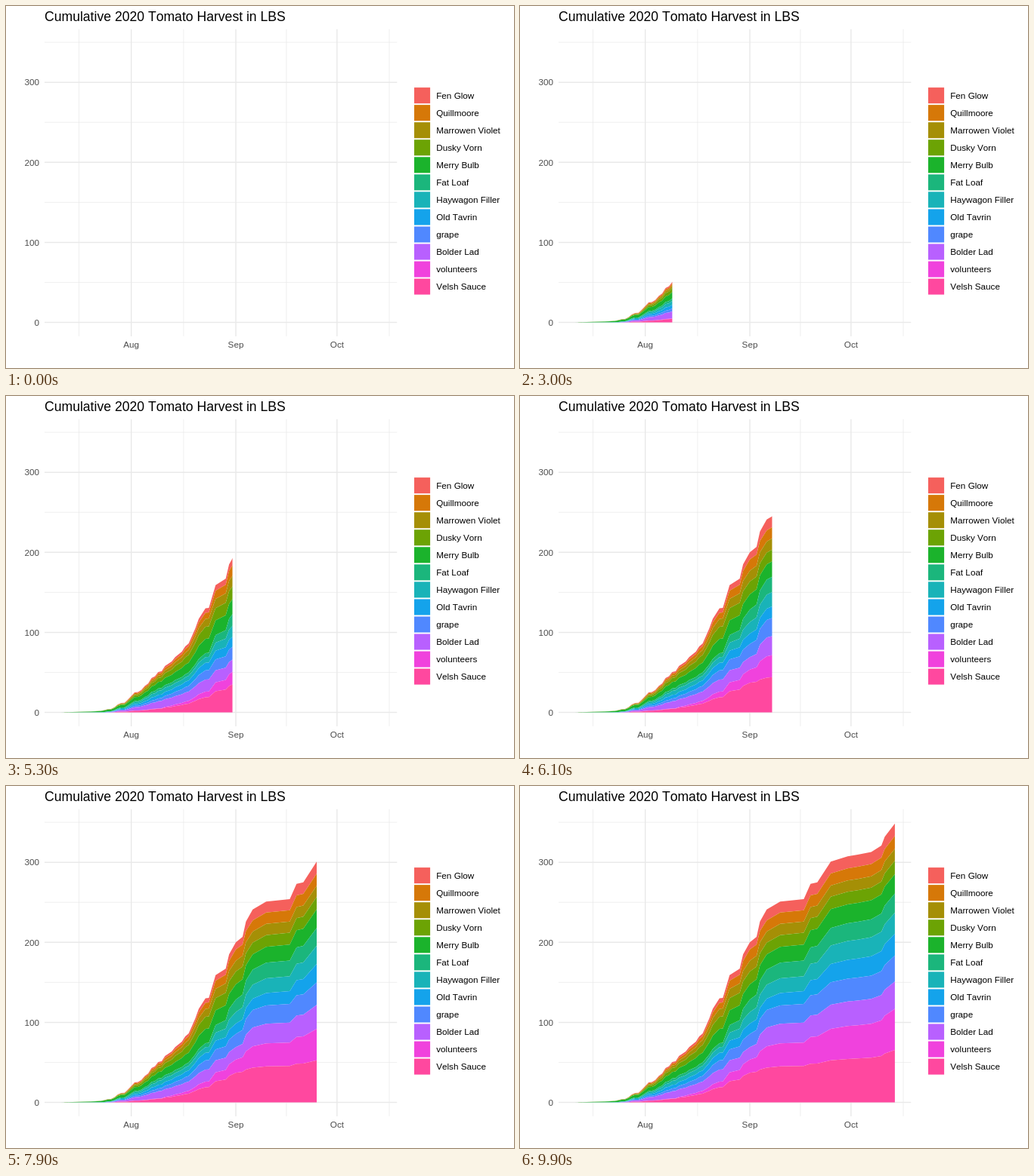
Animation, 672 px wide and 480 px high, one loop 10000 ms. Source, as an HTML page:

```html
<!DOCTYPE html>
<html lang="en">
<head>
<meta charset="utf-8">
<title>Tomato harvest</title>
<style>
  html, body { margin: 0; width: 100%; height: 100%; overflow: hidden; background: #fff; }
  svg { display: block; font: 11.73px "Liberation Sans", Arial, sans-serif; font-kerning: none; }
  .axis { fill: #4d4d4d; }
</style>
</head>
<body>
<svg width="672" height="480" viewBox="0 0 672 480">
  <clipPath id="reveal"><rect x="60" y="0" width="0" height="480"/></clipPath>
  <g id="grid" stroke="#e9e9e9"></g>
  <g id="areas" clip-path="url(#reveal)"></g>
  <g id="labels"><text x="51" y="20" font-size="17.6">Cumulative 2020 Tomato Harvest in LBS</text></g>
</svg>
<script>
const FRAMES = 99, DAYS = 95, STEP = 100;

// Stacked from the top of the legend down; the last one lies on the axis.
const series = [
  ['Fen Glow', '#f5605c'], ['Quillmoore', '#d67808'], ['Marrowen Violet', '#a58f06'],
  ['Dusky Vorn', '#6ca304'], ['Merry Bulb', '#1bb32c'], ['Fat Loaf', '#1bb67c'],
  ['Haywagon Filler', '#19b3b8'], ['Old Tavrin', '#14a3eb'], ['grape', '#5088ff'],
  ['Bolder Lad', '#b860ff'], ['volunteers', '#f042dd'], ['Velsh Sauce', '#ff489f']
];

// [day, total pounds]
const totals = [
  [0, 0], [9, 1.2], [12, 2], [13, 2.8], [14, 4], [15, 4.3], [16, 6.5], [17, 10],
  [18, 11.8], [19, 12], [20, 16], [21, 20.5], [22, 25], [23, 25.5], [24, 28], [25, 33],
  [26, 36], [27, 43], [28, 45], [29, 50.5], [30, 51.5], [31, 58], [33, 63.6], [34, 69],
  [36, 76], [37, 82.5], [38, 86], [39, 95.5], [40, 105], [41, 117], [43, 130], [44, 130.5],
  [46, 159], [49, 167], [50, 185], [52, 200], [54, 207], [55, 226], [57, 241], [61, 251],
  [68, 254], [70, 273], [72, 275], [76, 301], [81, 307.5], [84, 309.5], [88, 313],
  [91, 321], [92, 332], [95, 348.5]
];

// Layer tops from the axis upward at a few totals (last entry of each row).
const stacks = [
  Array(12).fill(0),
  [0, 0, 0, .1, .2, .3, .6, 2.5, 2.6, 2.7, 2.8, 2.8],
  [4.5, 5, 14, 17.5, 22, 27, 30, 38, 43, 46, 48.5, 50.5],
  [19, 26, 41, 52.5, 62, 69, 74, 92, 107, 117, 124.5, 130],
  [37, 53.5, 69, 85.5, 98.5, 113, 128.5, 147.5, 163.5, 177, 191, 200],
  [43.5, 70, 93.5, 115.5, 129.5, 147, 166, 185, 199.5, 213.5, 227.5, 241],
  [52.5, 92, 122, 150, 173, 196, 218, 241.5, 257, 271, 286, 301],
  [65.5, 117, 151, 183.5, 211, 237, 261, 285, 302, 317, 333, 348.5]
];

const $ = id => document.getElementById(id);
const px = day => 72 + day * 4.462;
const py = lbs => 419.55 - lbs * 1.0612;
const lerp = (a, b, p) => a + (b - a) * p;

function add(parent, tag, attrs, text = '') {
  const el = document.createElementNS('http://www.w3.org/2000/svg', tag);
  for (const k in attrs) el.setAttribute(k, attrs[k]);
  el.textContent = text;
  $(parent).append(el);
}

function layerTop(layer, total) {
  if (layer < 0) return 0;
  const i = Math.max(1, stacks.findIndex(s => s[11] >= total));
  const a = stacks[i - 1], b = stacks[i];
  return lerp(a[layer], b[layer], (total - a[11]) / (b[11] - a[11]));
}

const hLine = (lbs, w) => add('grid', 'path', { d: `M51 ${py(lbs)}H517.3`, 'stroke-width': w });
const vLine = (day, w) => add('grid', 'path', { d: `M${px(day)} 30.8V437.9`, 'stroke-width': w });

[50, 150, 250, 350].forEach(v => hLine(v, .71));
[5.5, 36.5, 67, 97.5].forEach(d => vLine(d, .71));
[0, 100, 200, 300].forEach(v => {
  hLine(v, 1.42);
  add('labels', 'text', { x: 44, y: py(v) + 4.2, 'text-anchor': 'end', class: 'axis' }, v);
});
[['Aug', 21], ['Sep', 52], ['Oct', 82]].forEach(([name, d]) => {
  vLine(d, 1.42);
  add('labels', 'text', { x: px(d), y: 453.2, 'text-anchor': 'middle', class: 'axis' }, name);
});

series.forEach(([name, fill], i) => {
  const y = 108.1 + i * 23.04, layer = 11 - i;
  add('labels', 'rect', { x: 540, y, width: 21.1, height: 21.1, fill });
  add('labels', 'text', { x: 569.2, y: y + 14.9 }, name);
  const edge = k => totals.map(([d, t]) => `${px(d)} ${py(layerTop(k, t))}`);
  add('areas', 'path', { d: `M${[...edge(layer), ...edge(layer - 1).reverse()].join('L')}Z`, fill });
});

// Each reading falls on a whole step; the front moves evenly between readings.
const stepOf = day => Math.round(day * FRAMES / DAYS);
function frontDay(step) {
  const i = Math.max(1, totals.findIndex(([d]) => stepOf(d) >= step));
  const a = totals[i - 1][0], b = totals[i][0];
  return lerp(a, b, (step - stepOf(a)) / (stepOf(b) - stepOf(a)));
}

const front = document.querySelector('#reveal rect');
const start = performance.now();
function draw() {
  const step = Math.floor((performance.now() - start) / STEP) % (FRAMES + 1);
  front.setAttribute('width', px(frontDay(step)) - 60);
  requestAnimationFrame(draw);
}
draw();
</script>
</body>
</html>
```
